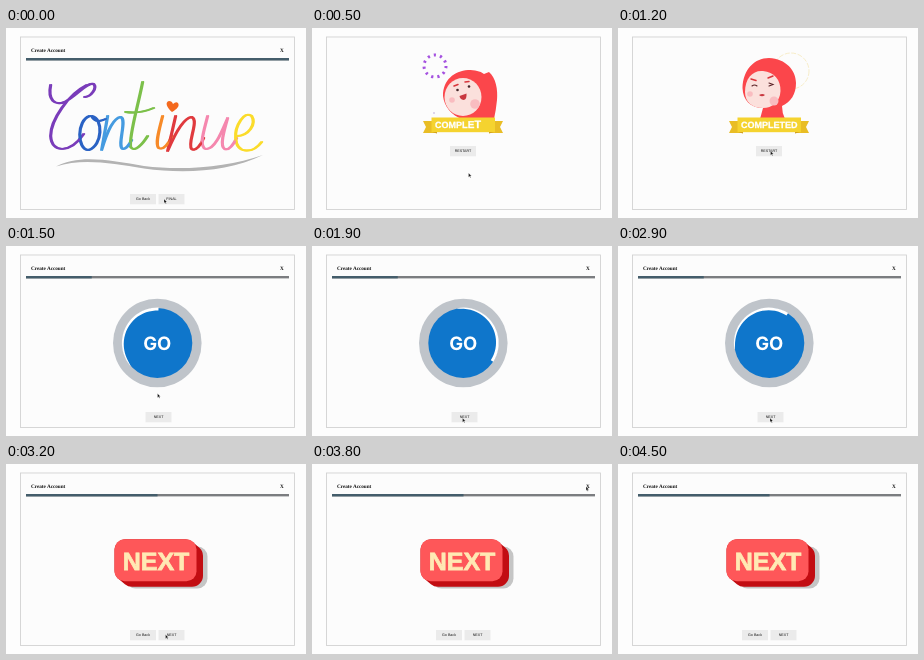
An HTML page that plays this animation: 300 by 190 pixels, repeating every 4600 ms.

```html
<!DOCTYPE html>
<html lang="en">
<head>
<meta charset="utf-8">
<title>Account steps</title>
<style>
html, body { margin: 0; width: 100%; height: 100%; overflow: hidden; background: #fdfdfd; }
svg { display: block; width: 300px; height: 190px; text-rendering: geometricPrecision; }
text { font-family: "Liberation Sans", Arial, sans-serif; }
.serif { font: bold 5.2px "Liberation Serif", Times, serif; fill: #111; }
.btn rect { fill: #ebebeb; }
.btn text { font-size: 3.65px; fill: #111; text-anchor: middle; }
.pen { fill: none; stroke-width: 1.9; stroke-linecap: round; stroke-linejoin: round; }
.thin { fill: none; stroke: #5b2328; stroke-width: 1.1; stroke-linecap: round; }
.brow { fill: none; stroke: #d8343b; stroke-width: 1.5; stroke-linecap: round; }
</style>
</head>
<body>
<svg viewBox="0 0 300 190">
  <rect x="14.5" y="9" width="274" height="172.5" fill="#fcfcfc" stroke="#d2d2d2" stroke-width=".9"/>

  <g id="header">
    <text class="serif" x="25" y="23.8">Create Account</text>
    <text class="serif" x="274" y="23.8">X</text>
    <rect x="20" y="30" width="263" height="2.4" fill="#7b7d80"/>
    <rect id="bar" x="20" y="30" height="2.4" fill="#445d6b"/>
  </g>

  <g id="final">
    <path d="M50 138.5C72 126 105 132 138 138C178 143 222 139 257 127C222 144 178 146 138 140.500C105 135 76 130 50 138.500Z" fill="#b3b3b3"/>
    <g id="ink" class="pen">
      <path stroke="#7a3cba" d="M44 57C41 72 48 78 58 74C70 68 80 54 87 56C91 60 84 69 78 69M80 57C62 66 44 92 44 108C45 126 64 125 77 106"/>
      <path stroke="#2a62c4" d="M83 88C70 92 70 122 82 122C96 118 97 90 85 88Q89 96 99 91"/>
      <path stroke="#459be0" d="M101 88L95 122C100 105 107 90 114 89C121 91 110 118 116 121C120 121 123 116 125 112"/>
      <path stroke="#7cc04a" d="M136 54C131 80 122 108 124 119C128 125 136 116 141 108M119 84Q133 86 147 80"/>
      <path stroke="#f78a28" d="M156 88C153 100 148 116 152 120C157 123 163 114 165 108"/>
      <path stroke="#e03a3e" d="M169 88L161 123C169 104 177 90 185 89C193 92 180 116 185 121C189 124 195 116 197 110"/>
      <path stroke="#f587ae" d="M201 88C197 104 192 118 199 121C208 122 215 104 221 90C217 104 213 118 218 121C223 123 227 116 230 110"/>
      <path stroke="#fbdc2b" d="M230 108C242 108 250 96 245 88C238 82 228 98 229 110C230 126 246 126 255 114"/>
    </g>
    <!-- sideways copy gives a broad-nib look -->
    <use href="#ink" x="1.3"/>
    <path fill="#f4691e" d="M166 84C160 79 159 74 163 73Q166 73 167 76Q170 73 172 75C174 78 171 81 166 84Z"/>
  </g>

  <g id="done">
    <circle id="burst" cx="123" cy="38" fill="none" stroke="#a552e0" stroke-width="3"/>
    <circle id="halo" cx="173" cy="43" fill="none" stroke="#f3e0a0" stroke-width=".7" stroke-dasharray="5 1.5"/>
    <g id="peek">
      <circle cx="122" cy="85" r=".8" fill="#b9a5d8"/>
      <path fill="#fb464b" d="M131 68C131 52 142 43 156 42C163 42 168 43 172 46L177 44C184 50 186 62 185 72Q184 82 182 91H150C140 88 132 78 131 68Z"/>
      <ellipse cx="151" cy="69" rx="18.500" ry="19" fill="#fbe0dc"/>
      <circle cx="163" cy="76" r="4.800" fill="#f9bcc0"/>
      <circle cx="140" cy="72" r="2.800" fill="#f9bcc0"/>
      <circle cx="145.500" cy="62" r="1.300" fill="#44262a"/>
      <circle cx="157" cy="58.500" r="1.300" fill="#44262a"/>
      <path fill="#c93840" d="M147.500 68L154.500 65.500Q155 71.500 151.500 72Q148 71.500 147.500 68Z"/>
      <path class="brow" d="M142 58l4-1.500M153 54l4-.5"/>
    </g>
    <g id="wink">
      <path fill="#fb464b" d="M124.500 60C125 42 136 30 151 30C168 31 178 42 178 55C178 66 173 74 164 78Q164 85 167 91H142L145 80C132 80 125 72 124.500 60Z"/>
      <path fill="#fbe0dc" d="M127 64C127 50 135 42 145 43C156 44 163 52 162.500 63C162 74 154 80 145 80C134 80 127 74 127 64Z"/>
      <circle cx="156" cy="73" r="4.500" fill="#f9bcc0"/>
      <circle cx="132" cy="66" r="2.800" fill="#f9bcc0"/>
      <path class="brow" d="M133 51l5 1.500M150 50l5-2"/>
      <path class="thin" d="M134 58q2.500-2 5 0M151 55l4 1.500-4 1.500"/>
      <path fill="#c93840" d="M141 67q3.500-2 6 0q-3 2.500-6 0Z"/>
    </g>
    <path fill="#e9bd25" d="M111 93H124V105H111L114 99ZM191 93H178V105H191L188 99Z"/>
    <path fill="#c99419" d="M120 104h5v1.500ZM182 104h-5v1.500Z"/>
    <rect x="119.500" y="89.500" width="63.500" height="14.700" fill="#f5d32f"/>
    <text id="word" x="123" y="100.300" font-weight="bold" fill="#fff" stroke="#fff" stroke-width=".3"></text>
  </g>

  <g id="go">
    <circle cx="151.300" cy="97" r="44.300" fill="#bfc4ca"/>
    <circle cx="151.300" cy="97" r="35" fill="#0f76cb"/>
    <path id="arc" fill="#fff"/>
    <text x="151.300" y="104" text-anchor="middle" fill="#fff" style="font:700 18.500px Inter,sans-serif">GO</text>
  </g>

  <g id="next">
    <rect id="shade" width="82" height="42" rx="10" fill="#c5c5c5"/>
    <path id="side" fill="none" stroke="#c20d12" stroke-width="22" stroke-linejoin="round"/>
    <g id="face">
      <rect width="82" height="42" rx="10" fill="#fe5759"/>
      <text x="41.500" y="30.300" text-anchor="middle" font-size="25" font-weight="bold" fill="#ffe9b4" stroke="#ffe9b4" stroke-width=".8">NEXT</text>
    </g>
  </g>

  <g id="buttons"></g>
  <path id="cursor" d="M0 0V4.200L1 3.300L1.700 4.800L2.400 4.400L1.700 3H3Z" fill="#111" stroke="#fff" stroke-width=".3"/>
</svg>
<script>
const $ = id => document.getElementById(id);
const LOOP = 4600, STEP = 100;
const clamp = v => Math.max(0, Math.min(1, v));
const smooth = (a, b, t) => { const u = clamp((t - a) / (b - a)); return u * u * (3 - 2 * u); };
const mix = (a, b, u) => a + (b - a) * u;

// start time and name of each page
const pages = [[0, 'final'], [200, 'done'], [1300, 'go'], [2000, 'next'], [2600, 'go'], [3000, 'next']];
const progress = { final: 1, go: .25, next: .5 };
const buttons = {
  final: [[124, 166, 'Go Back'], [152.5, 166, 'FINAL']],
  done: [[138, 118, 'RESTART']],
  go: [[139.5, 166, 'NEXT']],
  next: [[124, 166, 'Go Back'], [152.5, 166, 'NEXT']]
};
// time, x, y of the pointer tip
const track = [[0, 158, 171], [100, 158, 171], [500, 156.5, 145], [600, 155, 134], [1000, 152.5, 123],
  [1300, 152.5, 123], [1700, 150.5, 172], [2000, 150.5, 172], [2400, 140.5, 172], [2600, 140.5, 172],
  [2900, 152, 172], [3050, 152, 172], [3200, 159.5, 170.5], [3300, 159.5, 170.5], [3600, 264, 40],
  [3700, 273, 24], [3900, 275, 21], [4100, 286, -8], [LOOP, 286, -8]];

const letters = [...'COMPLETED'].map(c => {
  const span = document.createElementNS('http://www.w3.org/2000/svg', 'tspan');
  span.textContent = c;
  return $('word').appendChild(span);
});

function showPage(name) {
  for (const id of ['final', 'done', 'go', 'next']) $(id).style.display = id === name ? '' : 'none';
  $('header').style.display = name === 'done' ? 'none' : '';
  $('bar').setAttribute('width', 263 * (progress[name] || 0));
  $('buttons').innerHTML = buttons[name].map(([x, y, label]) =>
    `<g class="btn"><rect x="${x}" y="${y}" width="26" height="10.3"/><text x="${x + 13}" y="${y + 6.4}">${label}</text></g>`).join('');
}

function drawDone(t) {
  letters.forEach((span, i) => {
    const age = t - 235 - 40 * i;
    span.style.fontSize = 9 * (1 + .25 * (1 - clamp(age / 120))) + 'px';
    span.style.visibility = age < 0 ? 'hidden' : '';
  });
  const early = t < 850;
  $('peek').style.display = early ? '' : 'none';
  $('wink').style.display = early ? 'none' : '';
  $('peek').setAttribute('transform', `rotate(${-9 * smooth(500, 850, t)} 152 91)`);
  $('wink').setAttribute('transform', `rotate(${6 * (1 - smooth(850, 1200, t))} 155 91)`);

  const r = mix(4, 11, smooth(200, 500, t)) + 3 * smooth(500, 700, t);
  const gap = 2 * Math.PI * r / 11;
  $('burst').setAttribute('r', r);
  $('burst').setAttribute('stroke-dasharray', `${gap * .35} ${gap * .65}`);
  $('burst').style.opacity = 1 - smooth(550, 750, t);
  $('halo').setAttribute('r', mix(4, 18, smooth(800, 1200, t)));
  $('halo').style.opacity = t < 800 ? 0 : .8;
}

// crescent that thickens toward its leading end
function drawGo(age) {
  const turn = (age - 600) / 1200 * 360;
  const point = (r, deg) => {
    const a = (deg + turn) * Math.PI / 180;
    return (151.3 + r * Math.cos(a)).toFixed(2) + ' ' + (97 + r * Math.sin(a)).toFixed(2);
  };
  const inner = [], outer = [];
  for (let i = 0; i <= 24; i++) {
    const deg = mix(-100, 32, i / 24);
    outer.push(point(35.4, deg));
    inner.unshift(point(35 - 2.6 * Math.sqrt(i / 24), deg));
  }
  $('arc').setAttribute('d', 'M' + outer.concat(inner).join('L') + 'Z');
}

function drawNext(age) {
  const phase = age % 700;
  const press = smooth(250, 400, phase) * (1 - smooth(550, 700, phase));
  const x = mix(108.5, 111, press), y = mix(75.3, 78, press);
  const dx = mix(6.5, 3.5, press), dy = mix(5.5, 2.5, press);
  $('face').setAttribute('transform', `translate(${x} ${y})`);
  $('side').setAttribute('d', `M${x + 11} ${y + 11}h60l${dx} ${dy}v20h-60l${-dx} ${-dy}z`);
  $('shade').setAttribute('x', mix(119.5, 114.5, press));
  $('shade').setAttribute('y', mix(82.5, 80.5, press));
}

function drawCursor(t) {
  const i = track.findIndex(k => k[0] > t);
  const [t0, x0, y0] = track[i - 1], [t1, x1, y1] = track[i];
  const u = (t - t0) / (t1 - t0);
  $('cursor').setAttribute('transform', `translate(${mix(x0, x1, u)} ${mix(y0, y1, u)})`);
}

let shown;
function draw(now) {
  const t = Math.floor(now % LOOP / STEP) * STEP;
  const [start, name] = pages.filter(p => p[0] <= t).pop();
  if (name !== shown) showPage(shown = name);
  if (name === 'done') drawDone(t);
  if (name === 'go') drawGo(t - start);
  if (name === 'next') drawNext(t - start);
  drawCursor(t);
  requestAnimationFrame(() => draw(performance.now() - begin));
}
const begin = performance.now();
draw(0);
</script>
</body>
</html>
```
